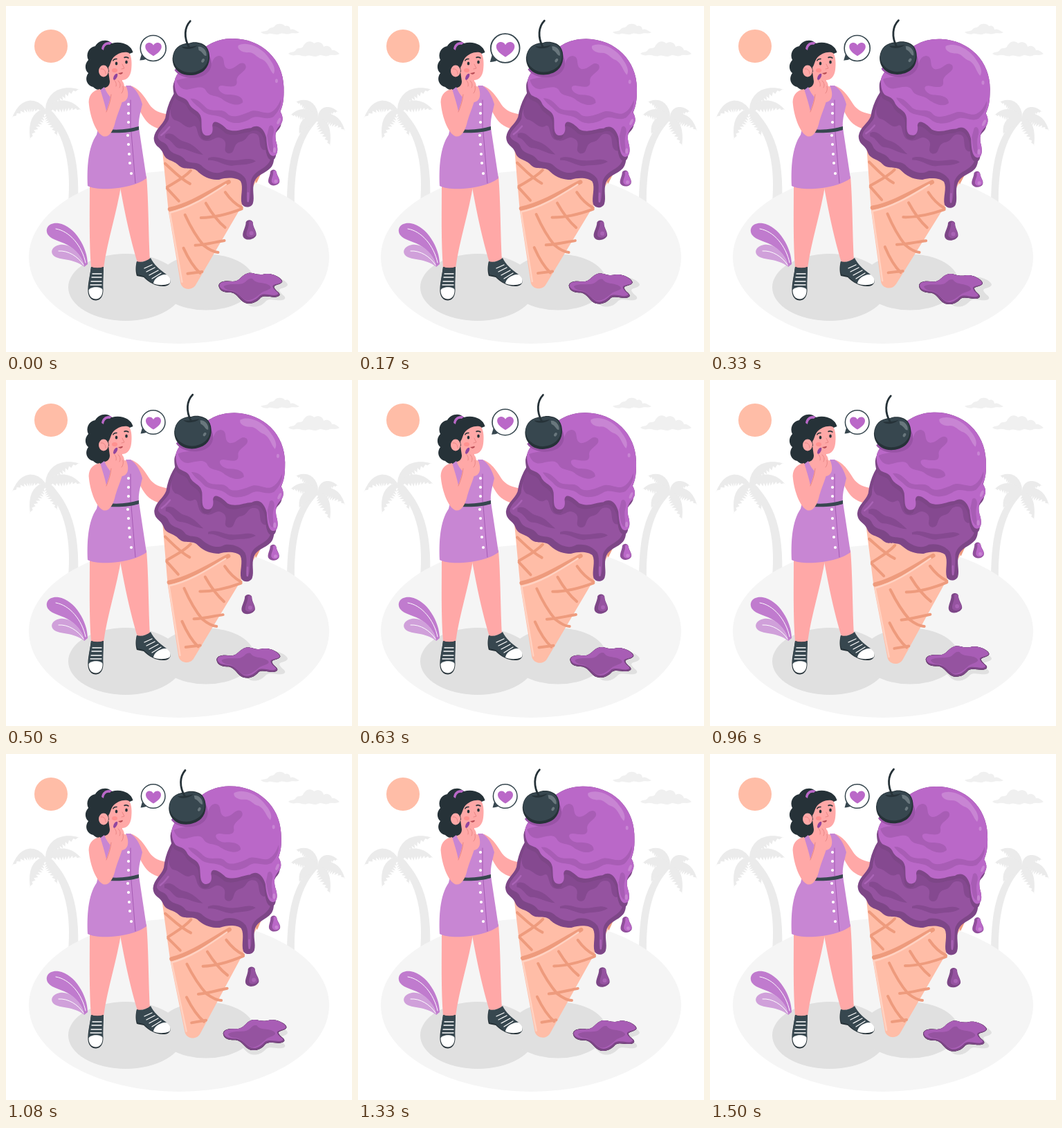
Animation of 500x500 px, one loop 1540 ms. Source, as an HTML page:

```html
<!DOCTYPE html>
<html lang="en">
<head>
<meta charset="utf-8">
<title>Ice cream</title>
<style>
html, body { margin: 0; width: 100%; height: 100%; overflow: hidden; background: #fff; }
svg { display: block; width: 100vw; height: 100vh; }
.line { fill: none; stroke-linecap: round; stroke-linejoin: round; }
.skin { fill: #ffa8a7; }
.ink { fill: #37474f; }
.dark { fill: #263238; }
.violet { fill: #ba68c8; }
.plum { fill: #9553a0; }
.deep { fill: #7d4687; }
</style>
</head>
<body>
<svg viewBox="0 0 500 500">
  <!-- backdrop -->
  <circle cx="65" cy="58" r="24" fill="#ffbda7"/>
  <g fill="#f0f0f0">
    <path d="M368 38C372 35 377 38 380 33C384 30 387 32 389 28C393 25 400 25 403 29C408 27 411 31 411 34C416 32 419 36 424 38C420 41 414 38 410 40C404 42 400 38 396 40C390 43 384 39 380 40C376 42 371 40 368 38Z"/>
    <path d="M408 69C412 65 417 68 419 63C423 59 428 63 430 57C434 50 442 50 445 54C451 50 458 53 459 59C464 56 470 59 471 64C476 63 479 67 482 69C476 73 470 69 466 72C460 74 456 69 451 72C445 75 440 70 435 72C429 74 424 70 419 71C415 72 411 71 408 69Z"/>
  </g>
  <g fill="#ebebeb">
    <path d="M90 285C94 235 88 188 54 152L61 147C94 178 107 220 104 285Z"/>
    <path d="M406 290C406 232 413 186 447 158L453 163C424 190 416 235 417 290Z"/>
    <g id="palms"></g>
  </g>
  <ellipse cx="250" cy="363" rx="217" ry="125" fill="#f5f5f5"/>
  <g fill="#e0e0e0">
    <ellipse cx="173" cy="406.500" rx="83" ry="48.500"/>
    <ellipse cx="289" cy="399" rx="70" ry="40.500"/>
    <use href="#puddle" x="7" y="5"/>
  </g>

  <!-- leaves -->
  <path d="M118 373C118 350 100 318 76 314C62 312 55 322 61 331C67 339 82 340 93 348C105 357 111 365 113 377Z" fill="#c07bce"/>
  <path d="M113 377C110 360 95 343 78 345C67 347 63 355 69 361C78 368 97 364 113 377Z" fill="#d0a0da"/>
  <g class="line" stroke="#fff" stroke-width="1">
    <path d="M72 322C92 325 110 347 115 371"/>
    <path d="M76 354C90 353 104 362 112 374"/>
  </g>

  <!-- woman -->
  <g class="skin">
    <path d="M121 255H167C160 300 146 340 141 379H123C120 340 121 300 121 255Z"/>
    <path d="M164 257L203 246C206 280 206 335 208 367L190 371C178 330 172 300 164 257Z"/>
  </g>
  <path class="dark" d="M123 377C121 392 118 402 118.500 413C119 421 124 425.500 130 425.500C137 425 140.500 419 140.500 410C140 400 140.500 390 141 377C135 379 129 379 123 377Z"/>
  <path class="ink" d="M123 377C121 392 119 402 119 411H140C140 400 140.500 390 141 377C135 379 129 379 123 377Z"/>
  <path fill="#fff" d="M119.500 411C121 405 138 405 139.500 410C140 418 136 423.500 130 423.500C123 423.500 119.500 418 119.500 411Z"/>
  <path class="dark" d="M189 369C187 376 187 384 189 390L199 392C207 400 218 406 229 405C236 404 239 400 237 395Z"/>
  <path class="ink" d="M189 369C188 376 188 382 190 388L199 390C206 397 211 401 216 402L232 388C222 381 213 373 209 364C203 369 195 371 189 369Z"/>
  <path fill="#fff" d="M213 401C213 394 224 387 231 388C238 392 239 398 236 401C229 404 220 404 213 401Z"/>
  <g class="line" stroke="#fff" stroke-width="1.300">
    <path d="M125 387H138M124 392H138M123 398H138M122 403H138"/>
    <path d="M200 379L211 374M203 384L215 378M207 389L220 382M211 394L224 386"/>
  </g>

  <path class="skin" d="M179 115C192 118 200 131 207 142C213 151 222 155 237 157V179C222 180 208 174 201 164C192 151 185 135 179 115Z"/>
  <path class="dark" d="M183.500 67C181 56 166 50 153 54C146 46 133 50 129 58C119 60 115 70 119 78C113 84 114 93 119 97C113 105 117 115 126 117C131 123 142 122 148 117L160 106L166 74Z"/>
  <path class="violet" d="M138 62C139 54 146 50 153 53L150 56C145 55 142 58 141 64Z"/>
  <path class="skin" d="M148 95L168 104V115C174 118 180 114 184 120L184 140H138L140 119C146 118 150 115 150 109Z"/>
  <path fill="#c886d3" d="M134 123L142 117C147 130 156 139 168 139C178 137 178 125 173 115L180 115C188 120 194 131 197 142C194 155 191 165 192 176L203 249C190 259 166 263 152 264C139 265 126 264 118 260C117 235 118 205 131 186L137 160Z"/>
  <path class="line" stroke="#a65ab4" d="M181 182L187 256M180 136V176"/>
  <path class="ink" d="M148 178C165 180 180 177 192 174V179C180 183 164 184 148 183Z"/>
  <g id="buttons" fill="#fff"></g>

  <path class="skin" d="M148 89C151 85 151 80 154 76C160 68 172 65 178 68C182 73 182 85 181 92C180 101 175 107 168 107C160 107 156 105 150 102Z"/>
  <ellipse class="skin" cx="141" cy="94" rx="7" ry="8.500"/>
  <path class="line" stroke="#e98786" d="M137 91C141 90 144 93 144 98M168 84L171 90L167 91"/>
  <ellipse cx="157" cy="93" rx="4" ry="3" fill="#ff918f"/>
  <g class="dark">
    <ellipse cx="159.500" cy="83" rx="1.800" ry="2.500"/>
    <ellipse cx="174" cy="81" rx="1.800" ry="2.500"/>
    <path d="M154 79C155 76 158 75 161 76L160 77.500C158 77 156 78 155 80ZM170 74C173 72 176 73 178 75L177 76C175 75 173 74 171 75.500Z"/>
  </g>
  <path d="M162 97C165 97 167 95 169 96C168 99 165 100 162 97Z" fill="#b84d55"/>
  <path class="skin" d="M136 120C124 122 118 131 120 143C122 161 130 183 140 188C148 191 154 182 157 171C160 158 168 141 171 127C172 118 171 110 167 108L160 102C156 100 154 104 155 107C150 111 150 117 151 123C152 133 148 143 145 152C143 142 139 130 136 120Z"/>
  <path class="line" stroke="#e98786" d="M156 107C159 109 160 113 159 116M162 108C165 111 166 114 164 118M169 116C170 120 169 124 167 126M152 128C151 138 148 146 145 153"/>
  <path d="M155 106C155 100 159 97 161 98C162 100 160 105 157 107Z" fill="#91469f"/>

  <!-- speech bubble -->
  <g id="bubble">
    <path class="ink" d="M194.500 77.500L197 69L204 75C201 77 198 77 194.500 77.500Z"/>
    <circle cx="212.700" cy="61" r="17.300" fill="#fff" stroke="#37474f" stroke-width="1.500"/>
    <path class="violet" d="M213 71.500C207 68 202 64 202 59C202 53 210 51.500 213 57C216 51.500 224 53 224 59C224 64 219 68 213 71.500Z"/>
  </g>

  <!-- ice cream -->
  <g id="treat">
    <path fill="#ffbda7" d="M226 210L235 296L253 401C256 411 270 412 275 403L371 237Z"/>
    <g class="line" stroke="#ee9b7d" stroke-width="4">
      <path d="M230 228C241 238 252 250 266 257M233 262C246 254 258 248 267 238M233 264L250 282"/>
      <path d="M237 294C265 288 294 269 322 254" stroke-width="6"/>
      <path d="M259 302C266 317 274 332 286 346C295 353 301 356 307 356M274 346C290 345 303 341 316 339"/>
      <path d="M289 285C296 297 305 310 317 320M282 306C303 306 323 300 341 293M317 269C324 279 331 286 341 291"/>
      <path d="M257 350C263 363 270 376 281 386M263 387L284 384"/>
    </g>
    <path class="line" stroke="#ffd2c2" stroke-width="2.500" d="M318 258C290 276 266 292 237 299L255 399"/>
    <path fill="#ee9b7d" d="M359 249L371 237L362 256Z"/>

    <path class="deep" d="M255 112C243 122 233 140 230 162C226 173 215 178 213.500 191C214 204 223 203 227 213C231 225 242 222 250 231C259 239 270 231 278 240C288 249 298 251 308 251C320 247 334 248 339 253C344 262 338 276 341 286C345 293 355 291 357 285C360 276 355 265 359 254C363 243 375 242 383 233C391 224 386 202 388 180L360 130Z"/>
    <path class="plum" d="M258 118C244 130 236 146 235 164C231 174 219 181 219 190C223 199 231 195 235 206C241 217 252 212 260 224C269 229 277 224 285 233C295 241 307 244 316 238C329 236 340 241 346 249C351 260 346 274 349 283C354 283 353 269 354 253C358 236 376 237 382 222C388 210 382 195 382 175L345 140Z"/>
    <g fill="#854990">
      <path d="M252 120C236 140 234 158 243 165C255 167 260 180 270 174C278 170 274 190 285 194C300 199 302 184 314 193C322 200 311 209 321 213C333 214 326 199 339 196C351 193 347 183 359 184C371 185 362 204 373 208C382 208 385 200 384 177L320 130Z"/>
      <path d="M230 186C242 180 247 194 257 196C270 199 277 208 285 215C271 214 262 206 250 206C242 204 240 193 230 191Z"/>
      <path d="M292 220C305 215 314 223 326 223C340 224 352 217 361 224C349 231 338 228 326 231C313 230 305 222 292 223Z"/>
    </g>
    <path class="line" stroke="#a963b5" stroke-width="2.500" d="M224 187C230 183 232 180 236 175M350 282V270"/>

    <path id="fringe" class="deep" transform="translate(-2 6)" d="M272 76C257 86 244 98 243 110C243 119 245 126 249 130C256 134 261 133 265 143C271 152 280 151 282 163C283 174 281 184 288 187C296 189 300 183 298 173C299 162 311 170 319 178C332 184 344 176 354 176C365 169 373 178 376 190C377 204 379 216 386 216.500C394 216 393 204 390 195C388 184 390 178 396 172C402 165 399 157 396 152C402 140 401 126 401 117C400 77 369 47 327 47C301 47 282 60 272 76Z"/>
    <use href="#fringe" x="2" y="-6" style="fill:#ba68c8" id="scoop"/>
    <path class="violet" d="M272 76C257 86 244 98 243 110C243 119 245 126 249 130C256 134 261 133 265 143C271 152 280 151 282 163C283 174 281 184 288 187C296 189 300 183 298 173C299 162 311 170 319 178C332 184 344 176 354 176C365 169 373 178 376 190C377 204 379 216 386 216.500C394 216 393 204 390 195C388 184 390 178 396 172C402 165 399 157 396 152C402 140 401 126 401 117C400 77 369 47 327 47C301 47 282 60 272 76Z"/>
    <g fill="#a85db5">
      <path d="M246 108C255 103 272 105 287 96C300 86 295 74 307 72C319 73 310 88 321 91C333 91 336 78 345 84C351 94 332 97 333 108C335 120 321 116 312 115C301 115 309 128 320 128C331 128 342 130 342 139C334 146 322 141 314 136C306 128 294 132 289 123C284 113 270 120 261 121C254 121 249 117 246 108Z"/>
      <path d="M266 134C277 133 283 142 290 148C300 154 312 147 319 155C326 164 343 156 351 153C362 147 374 158 383 153C391 149 395 139 397 134C398 145 393 153 386 160C374 166 365 156 354 162C342 170 326 172 316 163C306 156 291 160 283 151C278 145 272 143 266 134Z"/>
      <path d="M380 174C384 169 389 176 386 185C383 196 388 203 385 212C378 208 379 195 377 187Z"/>
    </g>
    <g fill="#c885d3">
      <path d="M335 57C348 50 370 60 380 76C388 86 389 94 386 98C380 92 379 82 370 77C360 74 359 66 348 67C340 67 333 62 335 57Z"/>
      <ellipse cx="390.500" cy="108" rx="2" ry="3"/>
      <ellipse cx="394" cy="166" rx="2" ry="5" transform="rotate(25 394 166)"/>
      <ellipse cx="388" cy="208" rx="2" ry="4"/>
    </g>

    <path fill="#9953a6" d="M243 93C251 105 276 108 289 98C297 92 298 82 294 73L270 60Z"/>
    <path class="dark" d="M240 76C241 62 250 54 264 54C270 51 283 52 289 59C296 68 295 85 286 93C277 101 260 103 250 96C243 91 240 84 240 76Z"/>
    <path class="ink" d="M241 74C242 62 251 55 263 55C270 52 282 53 288 60C294 69 293 82 285 89C276 97 261 99 251 92C245 88 241 82 241 74Z"/>
    <path fill="#263238" d="M253 59C257 64 270 63 276 57C269 59 261 60 253 59Z"/>
    <path class="line" stroke="#263238" stroke-width="2.800" d="M264 60C256 46 257 31 265.500 22"/>
    <path fill="#69777d" d="M277 59C284 58 290 65 289 72C285 73 284 66 278 64Z"/>
    <ellipse cx="284" cy="79" rx="2" ry="3" fill="#69777d" transform="rotate(30 284 79)"/>

    <path fill="#91509c" d="M382 239C384 235 390 235 391 240C392 246 397 250 395 255C392 260 383 261 379.500 255C378 250 382 245 382 239Z"/>
    <path class="violet" d="M386 239C388 236 391 238 391 241C392 247 396 250 394.500 254C392 258 386 258 384 254C383 249 387 245 386 239Z"/>
    <circle cx="390" cy="253" r="2.500" fill="#c885d3"/>
    <path class="deep" d="M347 312C349 308 355 308 357 312C357 320 363 325 362 331C359 338 346 340 343 333C341 327 347 320 347 312Z"/>
    <path class="plum" d="M351 312C354 309 357 311 357 314C357 321 362 325 361 330C358 335 350 335 348 331C347 325 352 320 351 312Z"/>
    <circle cx="355" cy="328" r="3" fill="#a963b5"/>

    <path id="puddle" d="M308 404C309 397 320 397 328 398C339 398 340 389 350 386C358 384 363 390 375 387C386 385 400 393 400 398C398 403 388 402 388 406C390 412 398 414 396 418C390 424 376 416 369 421C363 428 356 431 347 429C338 426 336 416 326 414C318 414 309 413 308 404Z"/>
    <use href="#puddle" fill="#7d4687"/>
    <path fill="#a85db5" d="M309 404C310 397 320 398 328 398C339 398 340 389 350 386C358 384 363 390 375 387C386 385 399 393 399 398C397 402 386 401 386 405C387 411 395 413 394 416C388 421 376 413 368 418C361 425 355 428 348 426C340 422 337 414 327 412C319 411 311 411 309 404Z"/>
    <path class="plum" d="M315 405C322 400 334 403 342 401C349 399 350 392 357 394C362 402 375 398 382 404C387 409 377 410 370 414C363 420 356 426 348 425C340 422 336 413 327 411C321 411 317 409 315 405Z"/>
  </g>
</svg>
<script>
const $ = id => document.getElementById(id);

// Palm frond: smooth upper edge, toothed lower edge along a quadratic curve.
function frond(x, y, cx, cy, tx, ty, side) {
  const at = (u, off) => {
    const v = 1 - u;
    const px = v * v * x + 2 * u * v * cx + u * u * tx;
    const py = v * v * y + 2 * u * v * cy + u * u * ty;
    const dx = v * (cx - x) + u * (tx - cx), dy = v * (cy - y) + u * (ty - cy);
    const len = Math.hypot(dx, dy) || 1;
    return `${(px - dy / len * off).toFixed(1)} ${(py + dx / len * off).toFixed(1)}`;
  };
  const bulge = u => 13 * Math.sin(Math.PI * Math.pow(u, .8)) * side;
  const pts = [];
  for (let u = 0; u <= 1; u += .1) pts.push(at(u, -bulge(u) * .35));
  for (let i = 10; i >= 1; i--) {
    const u = i / 10;
    pts.push(at(u, bulge(u)), at(u - .05, bulge(u) * .55));
  }
  return `<path d="M${pts.join('L')}Z"/>`;
}

const crowns = [
  [57, 149, [[28, 128, 8, 163, -1], [70, 116, 108, 121, 1], [86, 132, 109, 151, 1],
             [36, 160, 35, 194, -1], [74, 160, 73, 189, 1]]],
  [451, 160, [[440, 134, 418, 139, -1], [428, 148, 411, 158, -1], [426, 163, 424, 186, -1],
              [466, 172, 468, 203, 1], [477, 155, 490, 181, 1], [462, 144, 480, 153, 1]]]
];
$('palms').innerHTML = crowns.map(([x, y, leaves]) =>
  leaves.map(leaf => frond(x, y, ...leaf)).join('')).join('');

const buttons = [[177, 142], [177, 155], [177, 168], [176, 187], [177, 200], [178, 214], [179, 227], [181, 242]];
$('buttons').innerHTML = buttons.map(([x, y]) => `<circle cx="${x}" cy="${y}" r="2.1"/>`).join('');

// Keyframe tables: [progress, value], linear in between.
const SWAY = [[0, 0], [.25, 2], [.75, -2], [1, 0]];
const BEAT = [[0, 1], [.1, 1.25], [.3, 1], [.4, 1], [.5, 1.25], [.6, 1], [1, 1]];
const LOOP = 1540, FPS = 24, STEPS = 37;

function sample(table, p) {
  const i = Math.max(1, table.findIndex(([k]) => k >= p));
  const [a, from] = table[i - 1], [b, to] = table[i];
  return from + (to - from) * (p - a) / (b - a);
}

function draw(ms) {
  const step = Math.min(STEPS - 1, Math.floor((ms % LOOP + 6) * FPS / 1000));
  const p = (step + 1) / STEPS;
  const s = sample(BEAT, p);
  $('treat').setAttribute('transform', `rotate(${sample(SWAY, p)} 308 226)`);
  $('bubble').setAttribute('transform', `translate(212.7 61) scale(${s}) translate(-212.7 -61)`);
}

const start = performance.now();
function tick(now) {
  draw(Math.max(0, now - start));
  requestAnimationFrame(tick);
}
draw(0);
requestAnimationFrame(tick);
</script>
</body>
</html>
```
